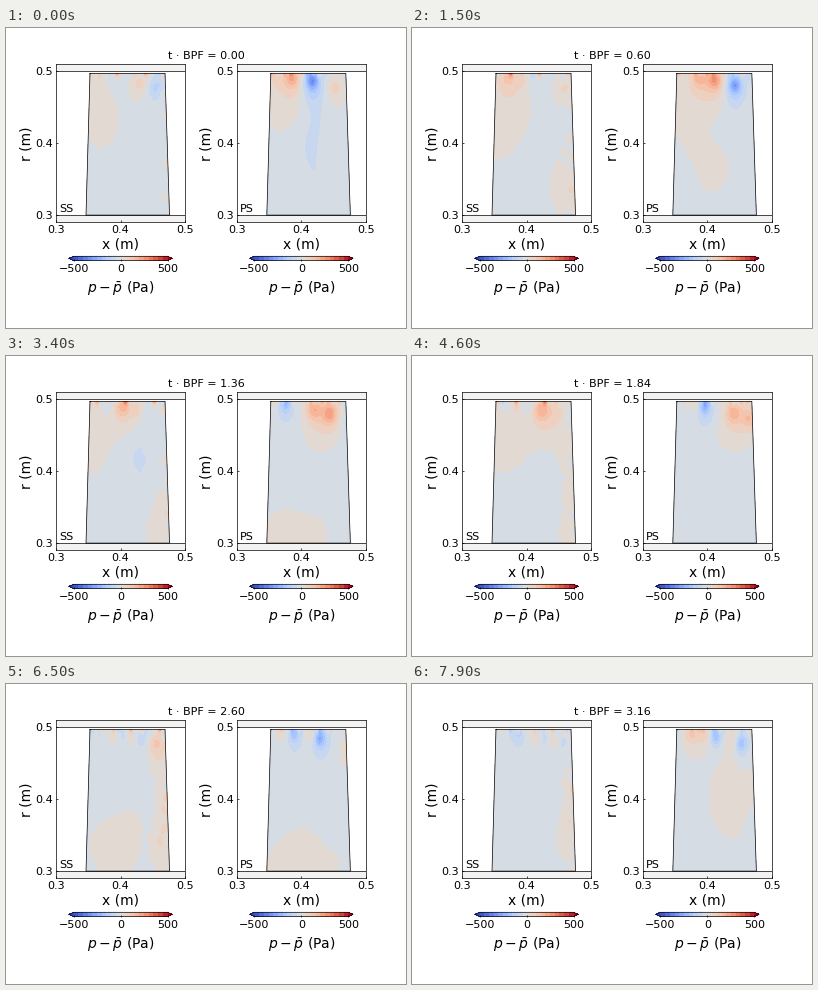
These frames come from a looping animation (400 by 300 pixels, 8000 ms). A matplotlib script:

```python
import numpy as np
import matplotlib.pyplot as plt
from matplotlib.animation import FuncAnimation

W, H, DPI = 400, 300, 100
FRAMES, STEP_MS = 80, 100
LEVELS = np.linspace(-500, 500, 21)
REST = -20                # Pa, quiet flow
DRIFT, LIFE = 1.1, 70     # tip vortex speed (px/frame) and lifetime (frames)

plt.rcParams.update({"font.family": "DejaVu Sans", "font.size": 8,
                     "axes.linewidth": 0.5})

# Blade grid: U = px right of the axis, V = px below the tip
s, v1 = np.meshgrid(np.linspace(0, 1, 110), np.linspace(0, 1, 150) ** 1.3)
V = v1 * 142
LEFT, RIGHT = 34 - 4 * v1, 109 + 4.5 * v1
U = LEFT + s * (RIGHT - LEFT)
X, R = 0.3 + U / 645.8, 0.497 - 0.197 * v1


def blob(x, y, u, v, wu, wv):
    return np.exp(-((x - u) / wu) ** 2 / 2 - ((y - v) / wv) ** 2 / 2)


class Flow:
    """Tip vortices riding over slow swells and fine ripples.

    vortices: (birth frame, Pa)
    swells: (peak frame, span, u, v, width, height, sign)
    """

    def __init__(self, seed, vortices, swells, tip, edge):
        self.vortices, self.swells = vortices, swells
        self.tip, self.edge = tip, edge
        self.phase = np.random.default_rng(seed).uniform(0, 2 * np.pi, 9)

    def vortex(self, t, birth, amp):
        age = t - birth
        if not 0 < age < LIFE:
            return 0
        u, v = 38 + DRIFT * age, 3 + 11 * (age / 55) ** 2
        core, halo = blob(U, V, u, v, 4.5, 6), blob(U, V, u, v + 3, 8, 14)
        return amp * np.sqrt(np.sin(np.pi * age / LIFE)) * (0.6 * core + 0.4 * halo)

    def swell(self, t, peak, span, u, v, wu, wv, sign):
        p = self.phase
        x = U + 3 * np.sin(V / 14 + p[7] + t / 15)
        y = V + 5 * np.sin(U / 10 + p[8] - t / 12)
        fade = np.exp(-((t - peak) / span) ** 2 / 2)
        return 45 * sign * fade * blob(x, y, u, v, wu, wv)

    def ripple(self, t):
        p, q = self.phase, U - DRIFT * t
        tip = sum(np.sin(q * k + a) for k, a in zip((.22, .41, .67, 1.1), p))
        wake = (np.sin(.5 * U + .23 * V - .3 * t + p[4])
                + np.sin(.37 * V - .2 * U - .25 * t + p[5])
                + np.sin(.13 * V + .12 * t + p[6]))
        return (self.tip * tip * np.exp(-V / 2.5)
                + self.edge * wake * np.exp((U - RIGHT) / 8))

    def field(self, t):
        return (REST + self.ripple(t)
                + sum(self.vortex(t, *a) for a in self.vortices)
                + sum(self.swell(t, *a) for a in self.swells))


ss = Flow(3,
          [(-55, -130), (-42, 100), (-13, -60), (-6, 90), (8, 180), (23, -110),
           (30, 110), (38, -100), (46, 80), (62, -120)],
          [(14, 17, 42, 25, 18, 48, 1.1), (46, 8, 70, 18, 45, 34, 1),
           (65, 8, 62, 115, 20, 26, 1), (23, 11, 104, 118, 13, 22, 1.4),
           (68, 18, 107, 95, 6, 38, 1.6), (34, 7, 85, 50, 14, 27, -1)],
          70, 17)
ps = Flow(8,
          [(-55, 120), (-34, -340), (-16, 260), (-2, 200), (25, -310),
           (31, 140), (48, -260), (55, 150), (69, 190)],
          [(8, 12, 45, 18, 18, 32, 1), (0, 4, 77, 68, 8, 38, -1),
           (22, 6, 70, 98, 27, 38, 1), (34, 6, 60, 138, 24, 20, 1),
           (65, 8, 64, 135, 28, 23, 1), (40, 7, 90, 22, 16, 26, 0.8),
           (79, 7, 88, 50, 18, 42, 1)],
          55, 5)

fig = plt.figure(figsize=(W / DPI, H / DPI), dpi=DPI, facecolor="white")


def box(x0, y0, x1, y1):
    return fig.add_axes([x0 / W, 1 - y1 / H, (x1 - x0) / W, (y1 - y0) / H])


def label(x, y, text, size=10, **kw):
    kw = {"ha": "center", "va": "center", **kw}
    return fig.text(x / W, 1 - y / H, text, fontsize=size, **kw)


def contour(ax, flow, t):
    return ax.contourf(X, R, flow.field(t), LEVELS, cmap="coolwarm",
                       extend="both", zorder=1)


class Panel:
    width = 310 / 2.4

    def __init__(self, x0, name, flow):
        self.flow = flow
        mid = x0 + self.width / 2
        self.ax = ax = box(x0, 36, x0 + self.width, 194.3)
        ax.set(xlim=(0.3, 0.5), ylim=(0.29, 0.51),
               xticks=(0.3, 0.4, 0.5), yticks=(0.3, 0.4, 0.5))
        ax.tick_params(direction="in", length=1.5, width=0.5, pad=2)
        for wall, end in ((0.5, 0.51), (0.3, 0.29)):
            ax.axhspan(wall, end, color="0.95", lw=0, zorder=0)
            ax.axhline(wall, color="k", lw=0.5, zorder=3)
        corners = [(0, 0), (0, -1), (-1, -1), (-1, 0), (0, 0)]
        ax.plot([X[c] for c in corners], [R[c] for c in corners],
                "k", lw=0.5, zorder=3)

        self.fill = contour(ax, flow, 0)
        half = 0.4 * self.width
        cax = box(mid - half, 228.3, mid + half, 232.5)
        bar = fig.colorbar(self.fill, cax=cax, orientation="horizontal",
                           ticks=(-500, 0, 500), extendfrac=0.05)
        bar.outline.set_linewidth(0.5)
        cax.tick_params(direction="in", length=1.5, width=0.5, pad=2.6)

        label(mid, 216.5, "x (m)")
        label(x0 - 30, 115.5, "r (m)", rotation=90)
        label(mid + 0.4, 260, r"$p-\bar{p}$ (Pa)")
        label(x0 + 3.3, 184.5, name, 8, ha="left", va="baseline")

    def draw(self, t):
        self.fill.remove()
        self.fill = contour(self.ax, self.flow, t)


panels = [Panel(50, "SS", ss), Panel(360 - Panel.width, "PS", ps)]
title = label(200, 28.2, "", 8)


def update(i):
    for panel in panels:
        panel.draw(i)
    title.set_text(f"t · BPF = {0.04 * i:.2f}")


anim = FuncAnimation(fig, update, frames=FRAMES, init_func=lambda: update(0),
                     interval=STEP_MS, repeat=True, repeat_delay=0)
plt.show()
```
